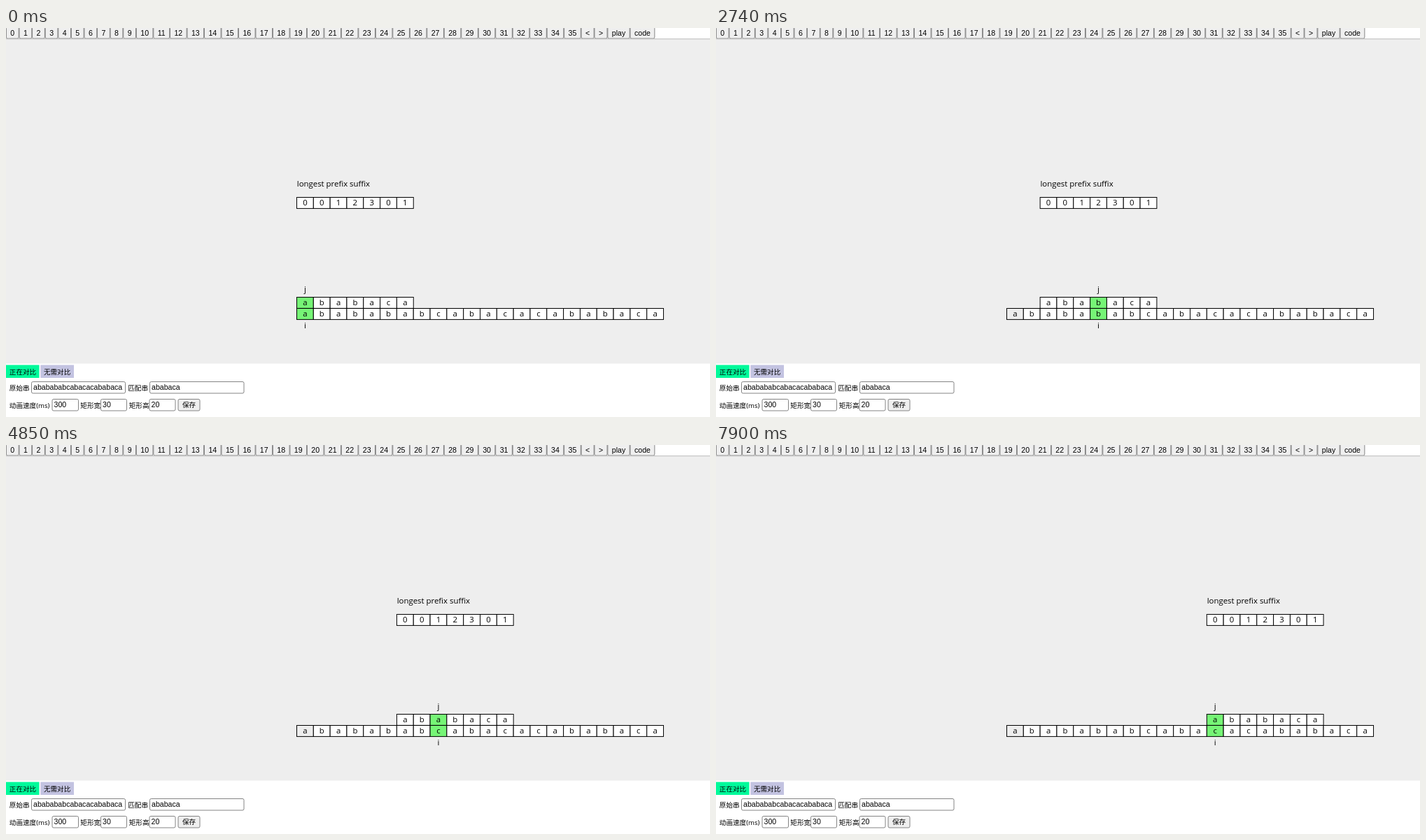
An HTML page with a canvas that plays this animation: 1006 by 557 pixels, repeating every 8000 ms.

```html
<!DOCTYPE html>
<html lang="zh">
<head>
<meta charset="utf-8">
<title>KMP</title>
<style>
html, body { margin: 0; width: 100%; height: 100%; overflow: hidden; background: #fff; }
canvas { display: block; }
</style>
</head>
<body>
<canvas id="stage" width="1006" height="557"></canvas>
<script>
const ctx = document.getElementById('stage').getContext('2d');
const LOOP = 8000;
const SOURCE = 'ababababcabacacababaca';
const PATTERN = 'ababaca';
const LEFT = 415.5, CELL_W = 23.82, CELL_H = 15.9;
const GREEN = '#76f576', PURPLE = '#c0c0dc', GREY = '#eee';
const UI = '10.6px "Liberation Sans", Arial, sans-serif';
const CELL_FONT = '11.4px "Open Sans", "Noto Sans", sans-serif';
const LABEL = '9.6px "Open Sans", "Noto Sans CJK SC", "Noto Sans CJK", sans-serif';

const TIMES = [0, 870, 1200, 1520, 1850, 2130, 2420, 2740, 3020, 3350, 3630, 3960, 4240,
  4520, 4850, 5180, 5460, 5740, 6070, 6390, 6670, 7000, 7290, 7610, 7900];

// Pointer passes: [time, x, y]
const PASSES = [
  [[80, 616, 546], [260, 700, 380], [480, 845, 120], [600, 889, 14], [730, 880, 11],
   [930, 880, 11], [1010, 905, 24], [1150, 975, 62]],
  [[4240, 958, 543], [4380, 940, 552]]
];

function buildLps(p) {
  const lps = [0];
  for (let i = 1, k = 0; i < p.length; i++) {
    while (k && p[i] !== p[k]) k = lps[k - 1];
    if (p[i] === p[k]) k++;
    lps.push(k);
  }
  return lps;
}

const LPS = buildLps(PATTERN);

function buildSteps(count) {
  const steps = [];
  let i = 0, j = 0;
  while (steps.length < count) {
    steps.push({ i, j, lookup: false });
    if (SOURCE[i] === PATTERN[j]) { i++; j++; }
    else if (!j) i++;
    else {
      steps.push({ i, j, lookup: true });
      j = LPS[j - 1];
    }
  }
  return steps;
}

const STEPS = buildSteps(TIMES.length);

function text(str, x, y, font, align = 'left') {
  ctx.font = font;
  ctx.textAlign = align;
  ctx.fillStyle = '#000';
  ctx.fillText(str, x, y);
}

function box(x, y, w, h, fill) {
  ctx.beginPath();
  ctx.roundRect(x, y, w, h, 2);
  ctx.fillStyle = fill;
  ctx.fill();
  ctx.strokeStyle = '#767676';
  ctx.lineWidth = 0.9;
  ctx.stroke();
}

function input(x, y, w, value) {
  box(x + 0.5, y + 0.5, w - 1, 16.5, '#fff');
  text(value, x + 3, y + 12.2, UI);
}

function toolbar(pointer) {
  const names = [...Array(36).keys(), '<', '>', 'play', 'code'];
  let x = 0;
  for (const name of names) {
    ctx.font = UI;
    const w = ctx.measureText(name).width + 12.7;
    const hover = pointer && pointer.y < 16 && pointer.x >= x && pointer.x < x + w;
    box(x + 0.4, -1.5, w - 0.8, 16.6, hover ? '#e5e5e5' : '#efefef');
    text(name, x + w / 2, 10.6, UI, 'center');
    x += w;
  }
}

function panel() {
  ctx.fillStyle = '#00fa9a';
  ctx.fillRect(0, 482.5, 47.5, 18.5);
  ctx.fillStyle = '#c3c3e1';
  ctx.fillRect(49.3, 482.5, 47.7, 18.5);
  text('正在对比', 4.8, 495.7, LABEL);
  text('无需对比', 53.9, 495.7, LABEL);

  text('原始串', 4.8, 518.5, LABEL);
  input(36, 506, 135, SOURCE);
  text('匹配串', 174.2, 518.5, LABEL);
  input(205, 506, 135.5, PATTERN);

  text('动画速度(ms)', 4.8, 543.6, LABEL);
  input(65.5, 531, 38.5, '300');
  text('矩形宽', 106.3, 543.6, LABEL);
  input(135, 531, 38, '30');
  text('矩形高', 175.7, 543.6, LABEL);
  input(204.5, 531, 38, '20');
  box(246, 531.5, 31, 16.5, '#efefef');
  text('保存', 261.5, 543.3, LABEL, 'center');
}

const cellX = k => LEFT + k * CELL_W;
const midX = k => cellX(k) + CELL_W / 2;

function row(items, start, y, fillOf) {
  ctx.strokeStyle = '#000';
  ctx.lineWidth = 1;
  [...items].forEach((item, k) => {
    const x = cellX(start + k);
    ctx.fillStyle = fillOf(k);
    ctx.fillRect(x, y, CELL_W, CELL_H);
    ctx.strokeRect(x, y, CELL_W, CELL_H);
    text(item, x + CELL_W / 2, y + 11.6, CELL_FONT, 'center');
  });
}

function match({ i, j, lookup }) {
  const shift = i - j;
  const border = lookup ? LPS[j - 1] : 0;

  text('longest prefix suffix', cellX(shift) + 0.3, 227, CELL_FONT);
  row(LPS, shift, 242.5, k => lookup && k === j - 1 ? PURPLE : '#fff');

  text('j', midX(i), 378, CELL_FONT, 'center');
  text('i', midX(i), 430, CELL_FONT, 'center');
  row(PATTERN, shift, 385.5, k =>
    k === j ? GREEN : k < border ? PURPLE : k === 0 && shift === 0 ? GREY : '#fff');
  row(SOURCE, 0, 401.5, k =>
    k === i ? GREEN : k < i && k >= i - border ? PURPLE : k === 0 ? GREY : '#fff');
}

function pointerAt(t) {
  for (const pass of PASSES) {
    const n = pass.findIndex(p => p[0] > t);
    if (n < 1) continue;
    const [t0, x0, y0] = pass[n - 1], [t1, x1, y1] = pass[n];
    const f = (t - t0) / (t1 - t0);
    return { x: x0 + (x1 - x0) * f, y: y0 + (y1 - y0) * f };
  }
  return null;
}

function drawPointer({ x, y }) {
  ctx.beginPath();
  ctx.moveTo(x, y);
  for (const [dx, dy] of [[0, 10.5], [2.3, 8.4], [4, 12.3], [5.6, 11.6], [4, 7.8], [7, 7.5]])
    ctx.lineTo(x + dx, y + dy);
  ctx.closePath();
  ctx.strokeStyle = '#fff';
  ctx.lineWidth = 1;
  ctx.stroke();
  ctx.fillStyle = '#000';
  ctx.fill();
}

function draw(t) {
  const pointer = pointerAt(t);
  ctx.fillStyle = '#fff';
  ctx.fillRect(0, 0, 1006, 557);
  toolbar(pointer);
  ctx.fillStyle = '#eee';
  ctx.fillRect(0, 16, 1006, 464.5);
  ctx.fillStyle = '#bbb';
  ctx.fillRect(0, 15.2, 1006, 1);
  match(STEPS[TIMES.filter(s => s <= t).length - 1]);
  panel();
  if (pointer) drawPointer(pointer);
}

const begin = performance.now();
function tick() {
  draw((performance.now() - begin) % LOOP);
  requestAnimationFrame(tick);
}
tick();
</script>
</body>
</html>
```
